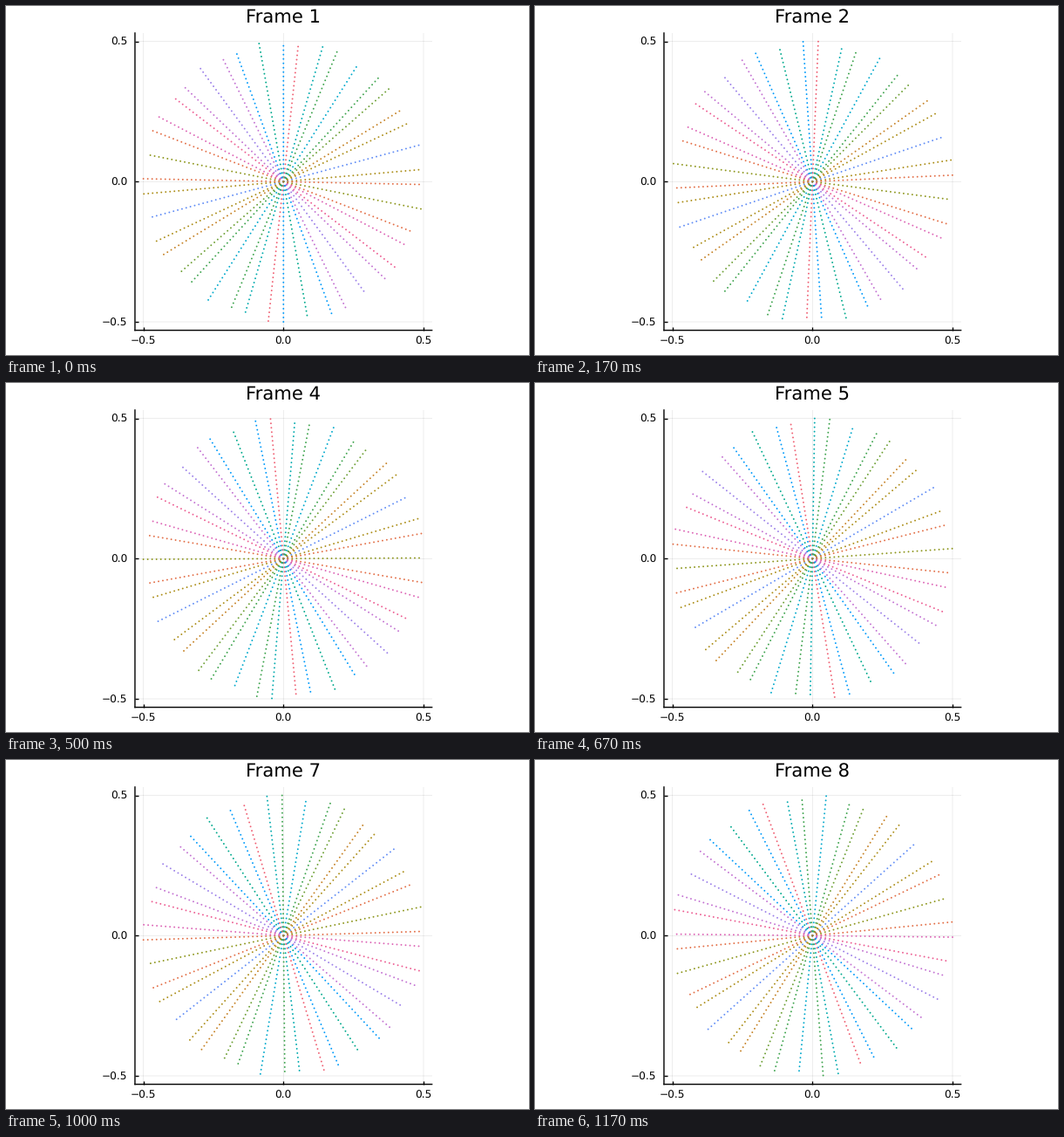
A matplotlib script that plays this animation: 600 by 400 pixels, repeating every 1.34 s.

```python
import numpy as np
import matplotlib.pyplot as plt
from matplotlib.animation import FuncAnimation

W, H, DPI = 600, 400, 100
CX, CY, UNIT = 318.3, 201.3, 321.4   # plot centre and pixels per data unit
LIMIT = 0.53
SPOKES, SAMPLES, STEPS = 21, 64, 8
TICK_MS, LOOP_MS = 10, 1340
GOLDEN = np.pi * (np.sqrt(5) - 1) / 2

PALETTE = ["#009AFA", "#E36F47", "#3EA44E", "#C371D2", "#AC8E18", "#00AAAE",
           "#ED5E93", "#C68225", "#00A98D", "#8E971E", "#00A9CC", "#9B7FE9",
           "#618DF6", "#F06073", "#DD65B6", "#6C9F33"]


def pt(px):
    return px * 72 / DPI


def label(x, baseline, text, px, ha="center"):
    """Place text by pixel position, measured from the top left corner."""
    return fig.text(x / W, 1 - baseline / H, text, size=pt(px), ha=ha, va="baseline")


def trajectory(step):
    """Golden-angle radial samples: each step shows the next set of spokes."""
    theta = GOLDEN * (step * SPOKES + np.arange(SPOKES))
    radius = np.arange(SAMPLES) / SAMPLES - 0.5
    x = np.outer(np.sin(theta), radius)
    y = np.outer(np.cos(theta), radius)
    return np.column_stack([x.ravel(), y.ravel()])


plt.rcParams.update({"font.family": "DejaVu Sans", "path.snap": False,
                     "text.hinting": "none"})
fig = plt.figure(figsize=(W / DPI, H / DPI), dpi=DPI, facecolor="white")

half = LIMIT * UNIT
ax = fig.add_axes([(CX - half) / W, 1 - (CY + half) / H, 2 * half / W, 2 * half / H])
ax.set(xlim=(-LIMIT, LIMIT), ylim=(-LIMIT, LIMIT))
ticks = [-0.5, 0, 0.5]
ax.set_xticks(ticks)
ax.set_yticks(ticks)
ax.tick_params(direction="in", length=pt(3.6), width=1,
               labelbottom=False, labelleft=False)
ax.spines[["top", "right"]].set_visible(False)
ax.spines[["left", "bottom"]].set_linewidth(1)
ax.set_axisbelow(True)
ax.grid(color="black", alpha=0.1, linewidth=0.5)

for value in ticks:
    text = f"{value:.1f}".replace("-", "\u2212")
    label(CX + value * UNIT, 387.4, text, 12.1)
    label(139.5, CY - value * UNIT + 4.4, text, 12.1, ha="right")

colors = [PALETTE[i % len(PALETTE)] for i in range(SPOKES) for _ in range(SAMPLES)]
start = trajectory(0)
dots = ax.scatter(start[:, 0], start[:, 1], s=pt(1.9) ** 2, c=colors,
                  linewidths=0, zorder=3)
title = label(CX, 18.3, "Frame 1", 21.2)


def update(tick):
    # six steps per second, rounded to whole ticks
    step = min(int((tick + 0.5) * 0.06), STEPS - 1)
    dots.set_offsets(trajectory(step))
    title.set_text(f"Frame {step + 1}")
    return dots, title


anim = FuncAnimation(fig, update, frames=LOOP_MS // TICK_MS, interval=TICK_MS,
                     repeat=True, repeat_delay=0, blit=False)
plt.show()
```
